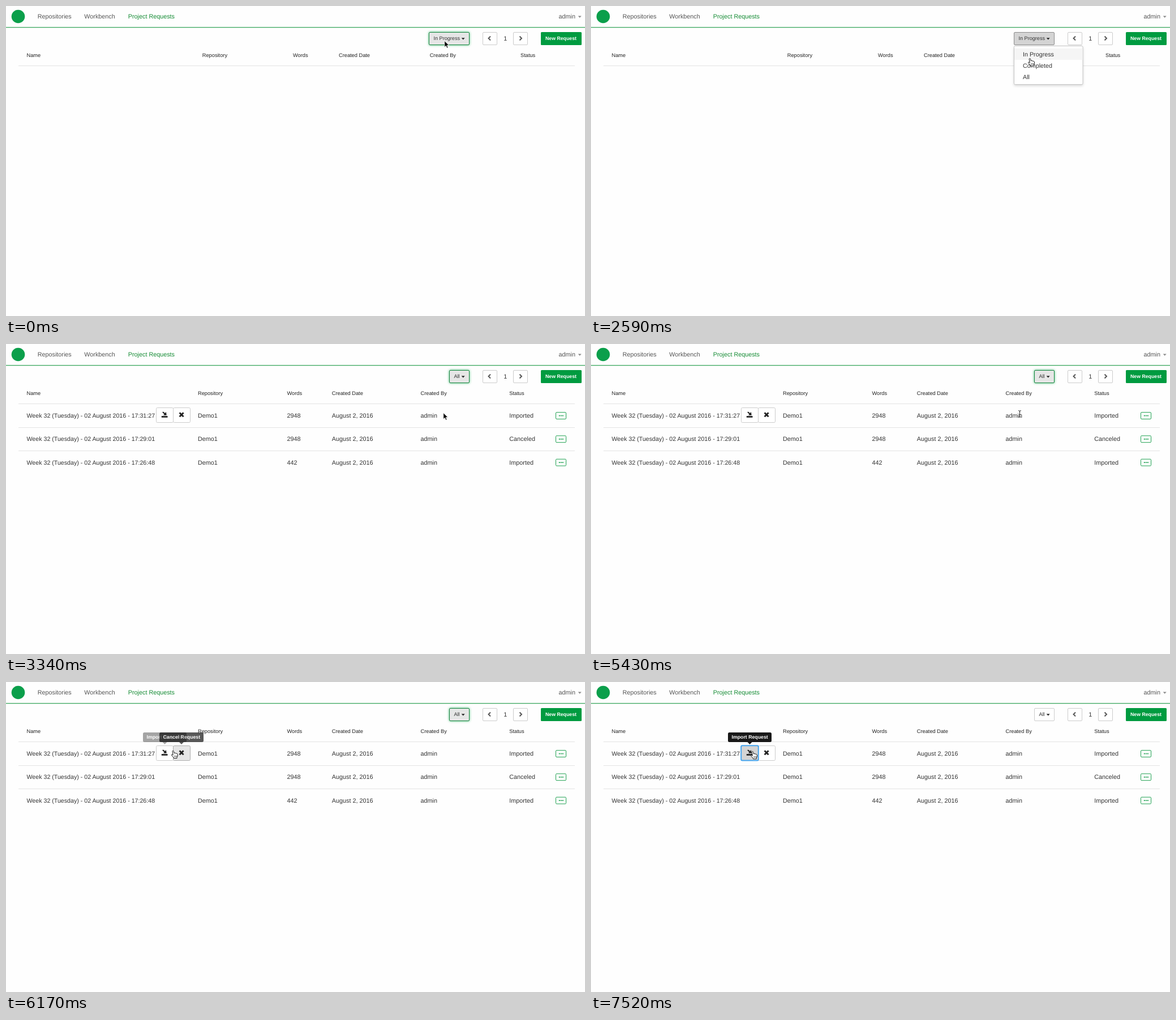
An HTML page for the animation above (8 s loop, 1023 by 547 pixels).

```html
<!DOCTYPE html>
<html lang="en">
<head>
<meta charset="utf-8">
<title>Project requests</title>
<style>
html, body { margin: 0; width: 100%; height: 100%; overflow: hidden; background: #fefefe; }
svg { display: block; width: 100vw; height: 100vh; }
text { font: 10.8px "Liberation Sans", Arial, sans-serif; fill: #333; text-rendering: geometricPrecision; white-space: pre; }
.nav { fill: #555; }
.on { fill: #128a32; }
.head { font-size: 9.25px; fill: #222; }
.name { font-size: 10.65px; }
.small { font-size: 9.1px; }
.menu { font-size: 10.75px; }
.bold { font-size: 8.75px; font-weight: bold; fill: #fff; }
.btn { fill: #fff; stroke: #ccc; }
.hover { fill: #e6e6e6; stroke: #adadad; }
.focus { fill: #e6e6e6; stroke: #16843f; filter: drop-shadow(0 0 2px rgba(0, 165, 65, .7)); }
.press { fill: #d4d4d4; stroke: #16843f; filter: drop-shadow(0 0 2px rgba(0, 165, 65, .7)); }
.open { fill: #d4d4d4; stroke: #8c8c8c; }
.fade { fill: #dfdfdf; stroke: #a3a3a3; }
.ring { fill: none; stroke: #46a5ee; stroke-width: 2; }
#menu > rect:first-child { filter: drop-shadow(0 2px 2px rgba(0, 0, 0, .15)); }
</style>
</head>
<body>
<svg id="stage" viewBox="0 0 1023 547" preserveAspectRatio="none"></svg>
<script>
const stage = document.getElementById('stage');
const text = (x, y, s, cls = '') => `<text x="${x}" y="${y}" class="${cls}">${s}</text>`;
const rect = (x, y, w, h, attrs = '') => `<rect x="${x}" y="${y}" width="${w}" height="${h}" ${attrs}/>`;
const path = (d, attrs = '') => `<path d="${d}" ${attrs}/>`;
const group = (id, body) => `<g id="${id}">${body}</g>`;
const caret = (x, y, color) => path(`M${x} ${y}h6l-3 3.2z`, `fill="${color}"`);
const line = y => rect(22, y, 983, 1, 'fill="#e4e4e4"');

const titles = ['Name', 'Repository', 'Words', 'Created Date', 'Created By', 'Status'];
const header = cols => titles.map((s, i) => text(cols[i], 90.3, s, 'head')).join('');
const filter = (id, x, label) =>
  rect(x, 46.5, 818.5 - x, 22, `id="${id}" rx="1.5"`) +
  text(x + 8, 60.3, label, 'small') + caret(804.7, 56.3, '#222');

const wide = [36.5, 346.8, 507, 588, 748.7, 909];
const tight = [36.5, 339, 496.5, 575.8, 732.5, 889.3];

const row = ([time, words, status], i) => {
  const y = 130 + i * 41.3;
  const cells = [`Week 32 (Tuesday) - 02 August 2016 - ${time}`, 'Demo1', words, 'August 2, 2016', 'admin', status];
  const dots = [977.8, 980.8, 983.8].map(x => rect(x - .9, y - 4.4, 1.8, 1.8, 'fill="#00943a"')).join('');
  return cells.map((s, c) => text(tight[c], y, s, c ? '' : 'name')).join('') +
    rect(971.5, y - 9.4, 18, 11.8, 'rx="1.5" fill="#fff" stroke="#1fa050"') + dots +
    (i ? line(Math.round(y - 24.4)) : '');
};
const rows = [['17:31:27', '2948', 'Imported'], ['17:29:01', '2948', 'Canceled'], ['17:26:48', '442', 'Imported']];

const tip = (id, x, w, label) => group(id,
  rect(x, 89, w, 17, 'rx="2.5"') + path(`M${x + w / 2 - 4} 106h8l-4 4z`) +
  text(x + 6.5, 100.3, label, 'bold'));

const actions =
  rect(265.5, 112.5, 30, 26, 'id="importBtn" rx="2"') +
  rect(295.5, 112.5, 30, 26, 'id="cancelBtn" rx="2"') +
  path('M274.8 127h10.7v2.8h-10.7zM276 120.2l2-.8 3 2.7 1.9-2 .8 5.6h-5.8l1.8-1.8z', 'fill="#222"') +
  path('M306.6 121.2l7 7m0-7l-7 7', 'stroke="#222" stroke-width="2.9"') +
  rect(265.2, 112.2, 30.6, 26.4, 'id="importRing" class="ring" rx="2"');

const menu = group('menu',
  rect(747.5, 70.5, 121.5, 68, 'rx="2" fill="#fff" stroke="#c4c4c4"') +
  rect(748, 75, 120.5, 20, 'id="mark" fill="#f5f5f5"') +
  ['In Progress', 'Completed', 'All'].map((s, i) => text(763, 88.6 + i * 20, s, 'menu')).join('') +
  rect(748, 114.5, 121, 20.5, 'id="menuRing" class="ring" rx="1"'));

const outline = 'stroke="#000" stroke-width=".9" stroke-linejoin="round" fill="#fff"';
const cursors = group('cursor',
  group('arrow', path('M0 0V11L2.6 8.7 4.4 12.8 6.3 12 4.5 8H8Z', 'stroke="#fff" stroke-width=".8"')) +
  group('hand', path('M2.2 1.2C3-.1 4.2.3 4.5 1.5L5.4 5C5.8 3.9 7.2 4 7.4 5.2 8 4.3 9.2 4.6 9.4 5.7 10.2 5 11.2 5.5 11.3 6.6L11.5 9.6 10.2 12V13.8H4.7L4.2 12.3 .7 8.4C.2 7.3 1.3 6.6 2.2 7.3L3.3 8.3Z', outline) +
    path('M6 9v2.8m2-2.8v2.8m2-2.8v2.4', 'stroke="#000" stroke-width=".7"')) +
  group('beam', path('M-2.3 .5Q0 .5 0 2 0 .5 2.3 .5M0 2V10.5M-2.3 12Q0 12 0 10.5 0 12 2.3 12M-1.3 7.8h2.6', 'fill="none" stroke="#222"')));

stage.innerHTML =
  '<circle cx="21.5" cy="18.5" r="11.8" fill="#0b9f4b"/>' +
  text(55.7, 22, 'Repositories', 'nav') + text(138.3, 22, 'Workbench', 'nav') +
  text(215.8, 22, 'Project Requests', 'nav on') + text(976.5, 22, 'admin', 'nav') + caret(1010.7, 17.5, '#888') +
  rect(0, 37, 1023, 1.4, 'fill="#48ad69"') +
  [842.5, 896.5].map(x => rect(x, 46.5, 25, 22, 'class="btn" rx="1.5"')).join('') +
  path('M856 53.5l-3.5 3.5 3.5 3.5M907.5 53.5l3.5 3.5-3.5 3.5', 'fill="none" stroke="#555" stroke-width="1.9"') +
  text(879.2, 60.7, '1', 'page') +
  rect(945, 46, 72, 23, 'rx="1.5" fill="#009b40"') + text(953, 60.3, 'New Request', 'bold') +
  line(105) +
  group('empty', header(wide) + filter('progressBtn', 747.5, 'In Progress')) +
  group('list', header(tight) + filter('allBtn', 783.5, 'All') + rows.map(row).join('') + actions +
    tip('importTip', 242, 77, 'Import Request') + tip('cancelTip', 271, 78, 'Cancel Request')) +
  menu + cursors;

const el = {};
stage.querySelectorAll('[id]').forEach(n => el[n.id] = n);
const show = (id, on) => el[id].style.display = on ? '' : 'none';

// Each step starts at t and inherits whatever it does not change.
const steps = [
  { t: 0, cur: 'arrow', x: 774.8, y: 61.5, filter: 'focus', menu: false, mark: -1, ring: false, list: false,
    imp: 'btn', can: 'btn', impTip: 0, canTip: 0, impRing: false },
  { t: 500, cur: 'hand', x: 771.5, y: 62.3, filter: 'press' },
  { t: 1100, filter: 'open', menu: true },
  { t: 2590, x: 772, y: 92, mark: 0 },
  { t: 2740, x: 771, y: 107, mark: 1 },
  { t: 2890, x: 768.8, y: 121.7, mark: 2 },
  { t: 3040, ring: true, filter: 'fade' },
  { t: 3340, cur: 'arrow', x: 772.8, y: 121.5, menu: false, list: true, filter: 'focus' },
  { t: 5430, cur: 'beam', x: 757.5, y: 117 },
  { t: 5580, cur: 'arrow', x: 503, y: 117 },
  { t: 5730, x: 328.5, y: 121 },
  { t: 5870, cur: 'hand', x: 311, y: 120.5, can: 'hover', canTip: .45 },
  { t: 6020, x: 303, y: 120 },
  { t: 6020, canTip: .9 },
  { t: 6170, x: 291.8, y: 120.8, canTip: .65, impTip: .35 },
  { t: 6320, x: 282, y: 122, can: 'btn', imp: 'hover' },
  { t: 6470, canTip: 0, impTip: .9 },
  { t: 7520, imp: 'open', impRing: true, filter: 'btn' }
];

function draw(now) {
  const t = now % 8000;
  const s = Object.assign({}, ...steps.filter(k => k.t <= t));
  show('empty', !s.list);
  show('list', s.list);
  show('menu', s.menu);
  show('mark', s.mark >= 0);
  show('menuRing', s.ring);
  show('importRing', s.impRing);
  el.mark.setAttribute('y', 75 + 20 * s.mark);
  el.progressBtn.setAttribute('class', s.filter);
  el.allBtn.setAttribute('class', s.filter);
  el.importBtn.setAttribute('class', s.imp);
  el.cancelBtn.setAttribute('class', s.can);
  el.importTip.style.opacity = s.impTip;
  el.cancelTip.style.opacity = s.canTip;
  for (const id of ['arrow', 'hand', 'beam']) show(id, id === s.cur);
  el.cursor.setAttribute('transform', `translate(${s.x} ${s.y})`);
  requestAnimationFrame(() => draw(performance.now() - start));
}
const start = performance.now();
draw(0);
</script>
</body>
</html>
```
